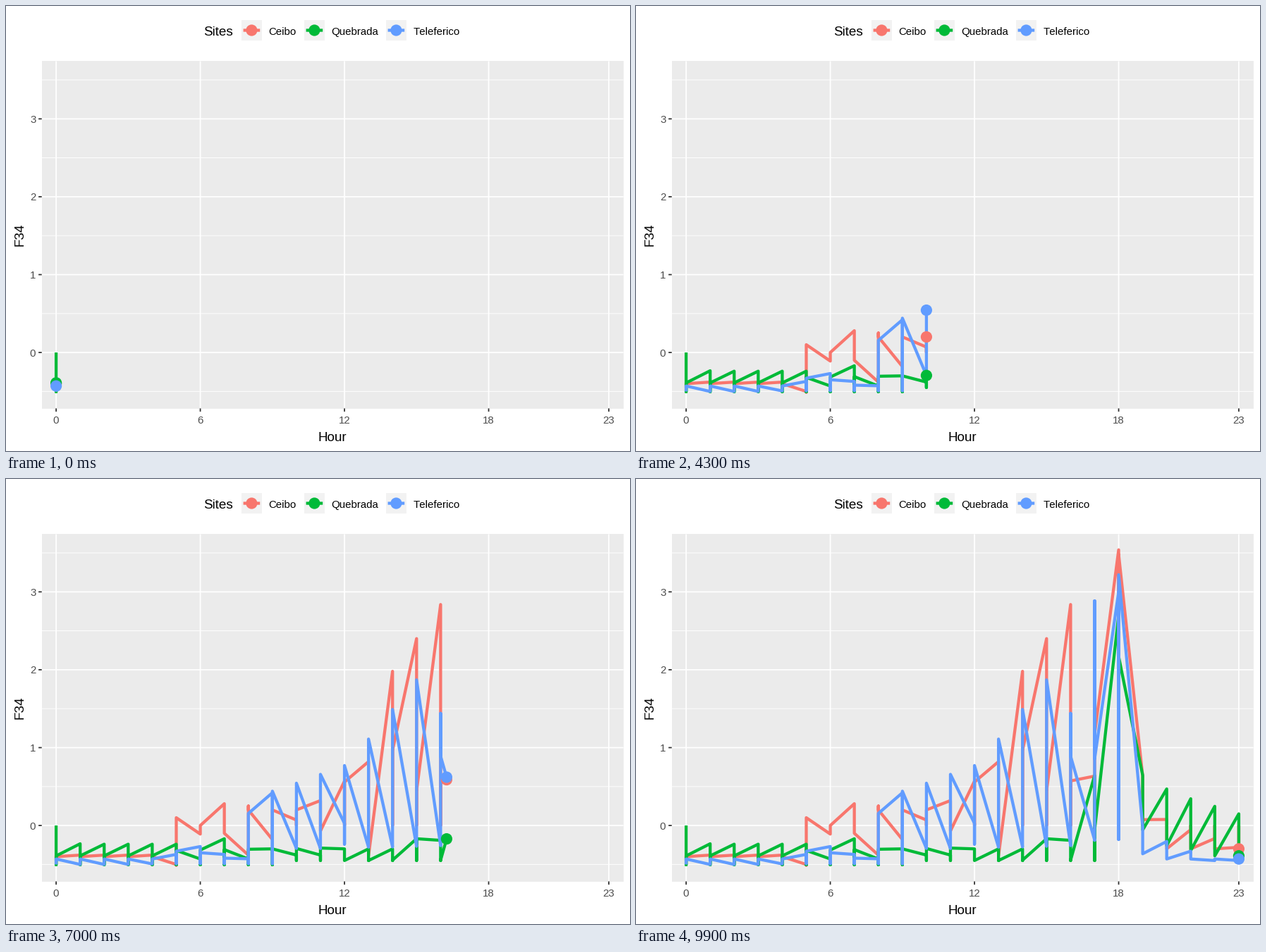
Write a matplotlib script that moves like this. It is 885x632 px and loops after 10 s.

```python
import matplotlib.pyplot as plt
import numpy as np
from matplotlib.animation import FuncAnimation
from matplotlib.patches import Circle, Rectangle

plt.rcParams.update({"font.family": "Liberation Sans", "path.simplify": False,
                     "text.kerning_factor": 6})

W, H, DPI = 885, 632, 100
FRAMES, LOOP_MS = 100, 10000
PT = 72 / DPI  # points per pixel

LEFT, RIGHT, TOP, BOTTOM = 50.7, 875.6, 78.4, 571.5
X0, X_STEP = 71.1, 34.08
Y0, Y_STEP = 492.1, 110.6
LINE_W, RADIUS = 4.3, 8.1
SMALL, LARGE = 15, 18.9

HOURS = np.arange(24)
FLIP = (-1.0) ** HOURS


def seg(a, b, start, end=None):
    """Straight run from hour a to hour b, zero elsewhere."""
    end = start if end is None else end
    t = (HOURS - a) / max(b - a, 1)
    return np.where((HOURS >= a) & (HOURS <= b), start + t * (end - start), 0)


def bump(centre, height, width=.5):
    return height * np.exp(-((HOURS - centre) / width) ** 2)


# Each site: level on entering an hour, on leaving it, the swing in between,
# and single spikes. All levels rest near -0.4 and peak at hour 18.
CEIBO = (
    -.38 + seg(5, 7, -.12, .66) + seg(9, 13, .2, 1.2) + seg(14, 16, 2.36, 3.2)
    + bump(18, 3.92, .86) + seg(20, 23, .44, .1),
    -.4 + seg(5, 7, .5, .3) + seg(8, 10, .6) + seg(11, 17, .33, 1.1)
    + FLIP * seg(12, 14, .5, .65) + bump(18, 3.88, .69) + seg(20, 23, .1),
    seg(0, 5, -.45, -.51),
    {8: .25},
)
QUEBRADA = (
    -.3 + bump(0, .3) + seg(1, 5, .06) + FLIP * seg(6, 8, -.13) + seg(10, 11, -.08)
    + seg(15, 16, .13, .08) + bump(18, 3, .93) + seg(20, 23, .74, .45),
    -.39 + seg(5, 11, .07, .1) + seg(12, 16, -.06) + bump(15, .28)
    + bump(18, 2.56, .7) + seg(20, 21, .13, .07),
    seg(0, 9, -.505) + seg(10, 17, -.45),
    {},
)
TELEFERICO = (
    -.45 + seg(0, 4, -.05) + bump(6, .18, 1.1) + bump(9, .87) + seg(10, 17, .14, .2)
    + bump(12, .32) + bump(18, 3.45) + seg(19, 21, .37, .12),
    -.43 + seg(5, 6, .1, .08) + bump(8, .585) + seg(9, 12, .86, 1.2)
    + seg(13, 15, 1.54, 2.3) + seg(16, 17, 1.32, 1.22) + bump(18, 3.65),
    seg(0, 9, -.49) + seg(10, 18, -.26, -.18) + seg(19, 23, -.36, -.46),
    {16: 1.44, 17: 2.885},
)
SITES = [("Ceibo", "#F8766D", CEIBO, 334),
         ("Quebrada", "#00BA38", QUEBRADA, 423),
         ("Teleferico", "#619CFF", TELEFERICO, 539)]


def px(hour):
    return X0 + X_STEP * hour


def py(value):
    return Y0 - Y_STEP * value


def label(x, y, text, size, color="black", **kw):
    ax.text(x, y, text, fontsize=size * PT, color=color, va="baseline", **kw)


def stroke(xs, ys, color, width, z):
    return ax.plot(xs, ys, color=color, lw=width * PT, zorder=z, snap=False,
                   solid_capstyle="butt", solid_joinstyle="round")[0]


def dot(x, y, color, z):
    return ax.add_patch(Circle((x, y), RADIUS, fc=color, lw=0, zorder=z))


def box(x, y, w, h, color):
    ax.add_patch(Rectangle((x, y), w, h, fc=color, lw=0, zorder=0))


fig = plt.figure(figsize=(W / DPI, H / DPI), dpi=DPI, facecolor="white")
ax = fig.add_axes([0, 0, 1, 1])
ax.set_xlim(0, W)
ax.set_ylim(H, 0)
ax.axis("off")

# Panel, grid and axes
box(LEFT, TOP, RIGHT - LEFT, BOTTOM - TOP, "#EBEBEB")
for k in range(5):
    y = py(k - .5)
    stroke([LEFT, RIGHT], [y, y], "white", .9, 1)
for v in range(4):
    y = py(v)
    stroke([LEFT, RIGHT], [y, y], "white", 1.78, 1)
    stroke([LEFT - 4.6, LEFT], [y, y], "#333333", 1.78, 1)
    label(42.3, y + 5.5, str(v), SMALL, "#4D4D4D", ha="right")
for hour in (0, 6, 12, 18, 23):
    x = px(hour)
    stroke([x, x], [TOP, BOTTOM], "white", 1.78, 1)
    stroke([x, x], [BOTTOM, BOTTOM + 4.6], "#333333", 1.78, 1)
    label(x - .3, 593, str(hour), SMALL, "#4D4D4D", ha="center")
label(462.6, 618, "Hour", LARGE, ha="center")
label(25, 325, "F34", LARGE, ha="center", rotation=90, rotation_mode="anchor")

# Legend and moving parts
label(280.3, 42, "Sites", LARGE)
paths, heads = [], []
for i, (name, color, _, kx) in enumerate(SITES):
    box(kx, 20, 29, 29, "#F2F2F2")
    stroke([kx + 2.6, kx + 26.2], [34.5, 34.5], color, LINE_W, 2)
    dot(kx + 14.4, 34.5, color, 3)
    label(kx + 38.6, 40.8, name, SMALL)
    paths.append(stroke([], [], color, LINE_W, 4 + i))
    heads.append(dot(0, 0, color, 8 + i))

# Each hour is reached on a whole step of the animation
ARRIVAL = np.rint(HOURS * (FRAMES - 1) / HOURS[-1]).astype(int)


def trace(data, step):
    enter, leave, swing, spikes = data
    now = np.searchsorted(ARRIVAL, step, side="right") - 1
    pts = [(h, v) for h in range(now + 1)
           for v in (enter[h], swing[h], spikes.get(h, leave[h]), leave[h])]
    if step > ARRIVAL[now]:
        t = (step - ARRIVAL[now]) / (ARRIVAL[now + 1] - ARRIVAL[now])
        pts.append((now + t, leave[now] + t * (enter[now + 1] - leave[now])))
    hours, values = np.array(pts).T
    return px(hours), py(values)


def draw(step):
    for (_, _, data, _), path, head in zip(SITES, paths, heads):
        xs, ys = trace(data, step)
        path.set_data(xs, ys)
        head.center = xs[-1], ys[-1]
    return paths + heads


anim = FuncAnimation(fig, draw, frames=FRAMES, interval=LOOP_MS / FRAMES,
                     repeat=True, repeat_delay=0)
plt.show()
```
